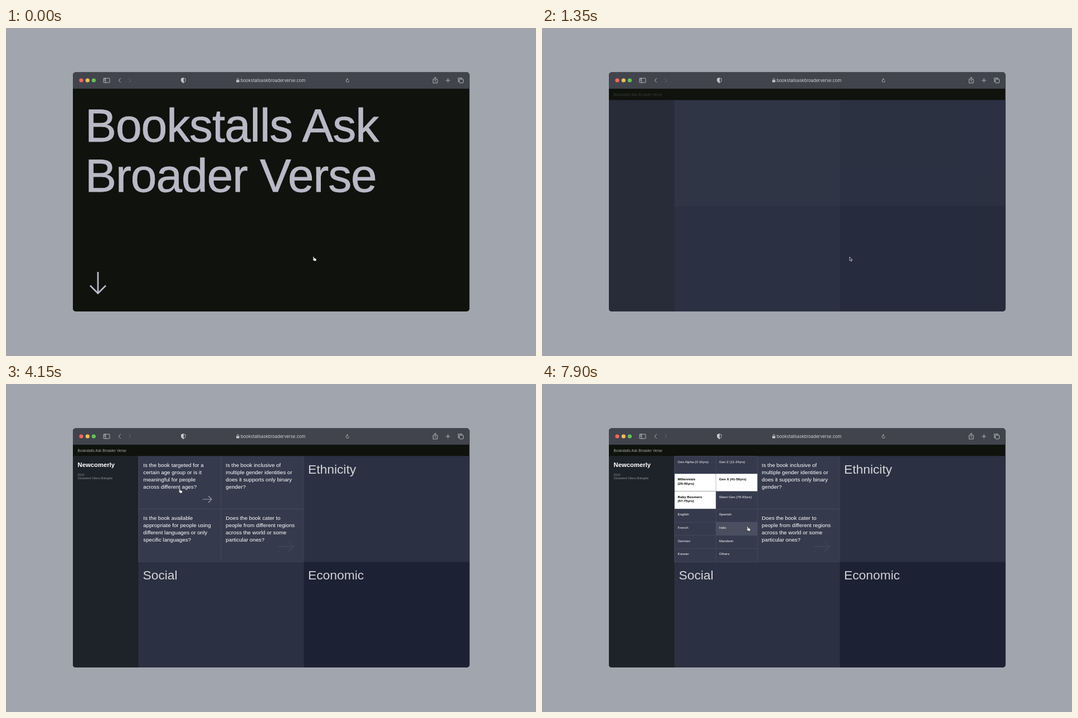
Recreate the animation shown at these times as an HTML page. Size 951 by 589 pixels, loop 8000 ms.

```html
<!DOCTYPE html>
<html lang="en">
<head>
<meta charset="utf-8">
<title>Book survey walkthrough</title>
<style>
html, body { margin: 0; width: 100%; height: 100%; overflow: hidden; background: #a1a5ae; }
svg { display: block; width: 100%; height: 100%; }
text { font-family: "Liberation Sans", Arial, sans-serif; fill: #fff; }
.line { fill: none; stroke-linecap: round; stroke-linejoin: round; }
.hero { font-size: 84px; letter-spacing: -1.1px; fill: currentColor; stroke: currentColor; stroke-width: .8px; }
.title { font-size: 22.8px; }
.question { font-size: 9.75px; }
.option { font-size: 6.2px; }
.chosen text { font-weight: bold; fill: #000; }
</style>
</head>
<body>
<svg viewBox="0 0 951 589">
  <defs>
    <clipPath id="window"><rect x="120" y="79.6" width="711.6" height="429.4" rx="5"/></clipPath>
  </defs>
  <g clip-path="url(#window)">
    <rect x="120" y="79" width="712" height="431" fill="#0f120d"/>
    <g id="hero">
      <text class="hero" x="142" y="203.5">Bookstalls Ask</text>
      <text class="hero" x="142" y="294">Broader Verse</text>
      <path fill="none" stroke="currentColor" stroke-width="2.8" d="M165 438V476M151 462.5L165 476.5L179 462.5"/>
    </g>
    <rect id="sheet" x="120" width="712" height="400"/>
    <g id="grid">
      <rect x="120" y="129.5" width="118" height="380" fill="#1e2229"/>
      <rect x="237.5" y="129.5" width="297" height="190" fill="#353b4d"/>
      <rect x="534.5" y="129.5" width="297" height="190" fill="#2b3042"/>
      <rect x="237.5" y="319.5" width="297" height="190" fill="#2b3042"/>
      <rect x="534.5" y="319.5" width="297" height="190" fill="#1c2134"/>
      <path d="M237.5 319.5H534.5V129.5" class="line" stroke="#3e4456" stroke-width=".7"/>
    </g>
    <text id="siteName" x="128.5" y="122" font-size="6.67">Bookstalls Ask Broader Verse</text>
    <g id="book">
      <text x="128.5" y="149" font-size="11.3" font-weight="bold">Newcomerly</text>
      <g font-size="5.3" opacity=".5">
        <text x="128.5" y="165">2013</text>
        <text x="128.5" y="171">Oluwatemi Nkeru Balogide</text>
      </g>
    </g>
    <text id="demographics" class="title" x="245.5" y="160.5">Demographics</text>
    <g id="titles">
      <text class="title" x="542" y="160.5">Ethnicity</text>
      <text class="title" x="245.5" y="350.5">Social</text>
      <text class="title" x="542" y="350.5">Economic</text>
    </g>
    <g id="panelArrows"></g>
    <path id="cellLines" class="line" stroke="#454b5d" stroke-width="1" d="M386.3 130V319M238 224.5H534M238 130V319"/>
    <g id="questions"></g>
    <g id="ages"></g>
    <g id="languages"></g>

    <rect x="120" y="79" width="712" height="30" fill="#41444c"/>
    <circle cx="135" cy="94" r="3.6" fill="#ed6a5e"/>
    <circle cx="146.3" cy="94" r="3.6" fill="#f5bf4f"/>
    <circle cx="157.4" cy="94" r="3.6" fill="#61c554"/>
    <g class="line" stroke="#c4c6ca" stroke-width=".9">
      <rect x="175" y="90.2" width="11" height="7.8" rx="1"/>
      <path d="M178.7 90.2V98M176.2 92H177.5M176.2 94H177.5"/>
      <path d="M205.5 90.5L202 94L205.5 97.5"/>
      <path d="M220.5 90.5L224 94L220.5 97.5" stroke="#6b6e76"/>
      <path d="M318.3 90L322 91.2V94.5Q321.5 97 318.3 98.5Q315.1 97 314.6 94.5V91.2Z"/>
      <path d="M318.3 90V98.5Q315.1 97 314.6 94.5V91.2Z" fill="#c4c6ca"/>
      <path d="M414.5 94V92.3A1.6 1.6 0 0 1 417.7 92.3V94"/>
      <rect x="414" y="94" width="4.2" height="3" fill="#c4c6ca"/>
      <path d="M615.6 94.6A2.7 2.7 0 1 1 613 91.9M612.3 90.4L613.7 91.9L612.3 93.4" stroke-width=".8"/>
      <path d="M768.4 92H766.3V98.8H774V92H771.9M770.1 96V88.5M768.2 90.3L770.1 88.4L772 90.3"/>
      <path d="M789.5 94H796.5M793 90.5V97.5"/>
      <path d="M813 96.2H811.5V89.8H818V91.3"/>
      <rect x="813.5" y="91.8" width="7" height="6.8" rx="1"/>
    </g>
    <text x="421" y="97" style="font:7.7px Inter,sans-serif;fill:#d0d1d5">bookstallsaskbroaderverse.com</text>
  </g>
  <g id="cursor">
    <path id="pointer" d="M0 0V7L1.7 5.6L2.8 8L4 7.4L2.9 5.2H5Z" fill="#222633" stroke="#e6e6ea" stroke-width=".7"/>
    <path id="hand" d="M-.7 0Q.1 -.5 .6 .6L1.3 2.6L4 3.2Q5 3.5 4.8 4.8L4.4 7.2H.9L-1.6 4.8Q-2 3.6 -.7 4L-.1 4.4L-1.1 .9Q-1.2 .2 -.7 0Z" fill="#fff" stroke="#222" stroke-width=".4"/>
  </g>
</svg>
<script>
const LOOP = 8000;
const $ = id => document.getElementById(id);
const clamp = v => Math.min(1, Math.max(0, v));
const easeOut = p => 1 - (1 - p) ** 2;
const mix = (a, b, p) => a + (b - a) * p;
const mixColor = (a, b, p) => `rgb(${a.map((v, i) => mix(v, b[i], p))})`;

function add(parent, markup) {
  parent.insertAdjacentHTML("beforeend", markup);
  return parent.lastElementChild;
}

const textLines = (name, x, y, step, lines) =>
  lines.map((s, i) => `<text class="${name}" x="${x}" y="${y + i * step}">${s}</text>`).join("");

// Right-pointing arrow whose tip is at (x, y)
const arrow = (x, y, length, head, width) =>
  `<path class="line" stroke="#fff" stroke-width="${width}" d="M${x - length} ${y}H${x}M${x - head} ${y - head}L${x} ${y}L${x - head} ${y + head}"/>`;

const question = (x, y, ...lines) =>
  add($("questions"), `<g>${textLines("question", x, y, 13, lines)}</g>`);

const ageQuestion = question(246.3, 148.5, "Is the book targeted for a", "certain age group or is it", "meaningful for people", "across different ages?");
question(394.3, 148.5, "Is the book inclusive of", "multiple gender identities or", "does it supports only binary", "gender?");
const languageQuestion = question(246.3, 243.5, "Is the book available", "appropriate for people using", "different languages or only", "specific languages?");
question(394.3, 243.5, "Does the book cater to", "people from different regions", "across the world or some", "particular ones?");
const ageArrow = add(ageQuestion, arrow(369, 207, 15.5, 5.5, 1.2));
const languageArrow = add(languageQuestion, arrow(369, 302, 15.5, 5.5, 1.2));
const demographicsArrow = add($("panelArrows"), arrow(516, 292, 27, 9, 2));
const socialArrow = add($("panelArrows"), arrow(516, 482, 27, 9, 2));

// Two-column list of answer cells, filled row by row
function optionList(group, top, rowHeight, labels) {
  return labels.map((label, i) => {
    const x = 238 + (i % 2) * 74.2, y = top + (i >> 1) * rowHeight;
    return add(group, `<g><rect x="${x}" y="${y}" width="74.2" height="${rowHeight}" fill="#353b4d" stroke="#454b5d" stroke-width=".7"/>
      <rect x="${x}" y="${y}" width="74.2" height="${rowHeight}" fill="#fff" opacity="0"/>
      ${textLines("option", x + 5.5, y + 11.8, 7.6, label.split("|"))}</g>`);
  });
}
const [, , millennials, genX, boomers] = optionList($("ages"), 129.7, 31.6,
  ["Gen Alpha (0-10yrs)", "Gen Z (11-24yrs)", "Millennials|(25-40yrs)", "Gen X (41-56yrs)", "Baby Boomers|(57-75yrs)", "Silent Gen (76-93yrs)"]);
const indic = optionList($("languages"), 224.5, 23.7,
  ["English", "Spanish", "French", "Indic", "German", "Mandarin", "Korean", "Others"])[3];

const cursorPath = [
  [0, 552, 411], [1700, 552, 411], [1950, 513, 395], [2600, 513, 395], [2850, 459, 231],
  [3000, 459, 231], [3600, 351, 225], [3850, 351, 225], [4100, 311.5, 188.5], [4200, 311.5, 188.5],
  [4600, 307, 184.5], [5150, 307, 184.5], [5350, 302, 178], [5900, 302, 178], [6100, 294, 204],
  [6250, 294, 204], [6480, 355, 176], [6900, 355, 176], [7500, 369, 256.5], [LOOP, 369, 256.5]
];
function cursorAt(t) {
  const i = cursorPath.findIndex(k => k[0] > t);
  const a = cursorPath[i - 1], b = cursorPath[i];
  const p = (t - a[0]) / (b[0] - a[0]), s = p * p * (3 - 2 * p);
  return [mix(a[1], b[1], s), mix(a[2], b[2], s)];
}

function show(node, opacity, dy = 0) {
  node.setAttribute("opacity", opacity);
  node.setAttribute("transform", `translate(0 ${dy})`);
}
function highlight(cell, amount, chosen) {
  cell.children[1].setAttribute("opacity", amount);
  cell.classList.toggle("chosen", chosen);
}

function draw(t) {
  const ramp = (from, to) => clamp((t - from) / (to - from));

  $("hero").style.color = mixColor([185, 185, 198], [255, 255, 255], ramp(0, 650));
  const leave = ramp(900, 1200);
  show($("hero"), 1 - leave, -10 * leave ** 1.3);

  $("sheet").setAttribute("y", mix(509.5, 129.5, ramp(914, 1204)));
  $("sheet").setAttribute("fill", mixColor([200, 197, 222], [44, 50, 66], leave));
  show($("grid"), ramp(1200, 1650));
  show($("siteName"), .63 * ramp(1250, 1650));

  const bookIn = easeOut(ramp(1600, 2350));
  show($("book"), bookIn, 5 * (1 - bookIn));
  const titleIn = easeOut(ramp(1750, 2550)), rise = 7 * (1 - titleIn);
  const opened = ramp(3850, 4000);
  show($("titles"), .8 * titleIn, rise);
  show($("demographics"), (.8 * titleIn + .2 * ramp(2600, 2850)) * (1 - opened), rise);
  show(socialArrow, .6 * ramp(2150, 2500) * (1 - ramp(2600, 2850)));
  show(demographicsArrow, .6 * ramp(2600, 2850) * (1 - .92 * opened));

  const questionsIn = easeOut(ramp(3900, 4130));
  show($("cellLines"), questionsIn);
  show($("questions"), questionsIn, 5 * (1 - questionsIn));
  show(ageArrow, .5 * ramp(4050, 4150));
  show(languageArrow, .5 * ramp(7150, 7400));
  show(ageQuestion, 1 - ramp(4450, 4550));
  show($("ages"), ramp(4450, 4600));
  show(languageQuestion, 1 - ramp(7750, 7850));
  show($("languages"), ramp(7750, 7900));

  const confirm = ramp(6550, 6650);
  const selected = from => mix(mix(.1, .43, ramp(from, from + 150)), 1, confirm);
  highlight(millennials, selected(5500), t >= 5500);
  highlight(boomers, t < 6000 ? 0 : selected(6100), t >= 6100);
  highlight(genX, t < 6400 ? 0 : mix(.1, 1, confirm), t >= 6600);
  highlight(indic, .1, false);

  const isHand = t < 950 || t > 2550;
  show($("hand"), +isHand);
  show($("pointer"), +!isHand);
  $("cursor").setAttribute("transform", `translate(${cursorAt(t)})`);
}

function frame() {
  draw(performance.now() % LOOP);
  requestAnimationFrame(frame);
}
frame();
</script>
</body>
</html>
```
